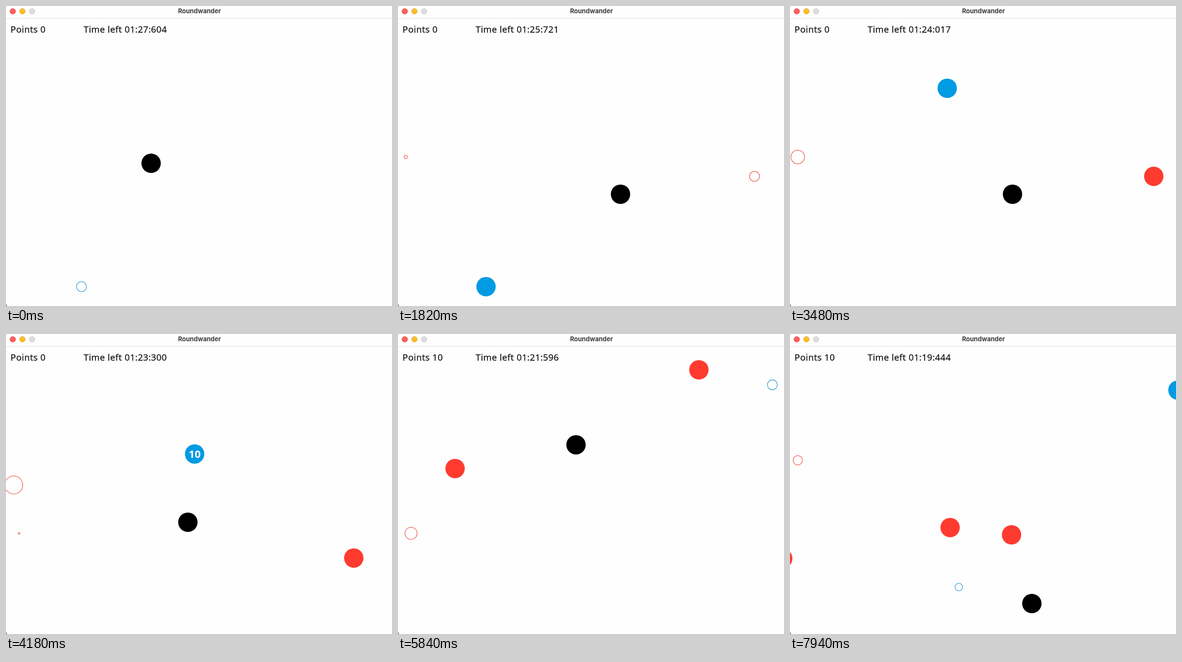
Animation of 798 by 620 pixels, one loop 8000 ms. Source, as an HTML page:

```html
<!DOCTYPE html>
<html lang="en">
<head>
<meta charset="utf-8">
<title>Roundwander</title>
<style>
  html, body { margin: 0; width: 100%; height: 100%; overflow: hidden; background: #fefefe; }
  svg { display: block; }
  .hud { font: 18.5px "Noto Sans", sans-serif; letter-spacing: .4px; fill: #161616; stroke: #161616; stroke-width: .25; }
  .title { font: 700 13px Inter, sans-serif; fill: #3c3c3c; text-anchor: middle; }
  .value { font: 700 22px "Noto Sans", sans-serif; fill: #fff; text-anchor: middle; }
</style>
</head>
<body>
<svg width="798" height="620" viewBox="0 0 798 620">
  <rect width="798" height="620" fill="#fefefe"/>
  <g id="field"></g>
  <text class="value" id="value">10</text>
  <text class="hud" id="points" x="9.3" y="55"></text>
  <text class="hud" id="clock" x="160.5" y="55"></text>
  <rect width="798" height="25" fill="#fefefe"/>
  <rect y="25" width="798" height="1" fill="#dedede"/>
  <g stroke-width=".8">
    <circle cx="14" cy="11" r="5.8" fill="#ff5f57" stroke="#e2463f"/>
    <circle cx="34" cy="11" r="5.8" fill="#febc2e" stroke="#e0a023"/>
    <circle cx="54" cy="11" r="5.8" fill="#dcdcdc" stroke="#c8c8c8"/>
  </g>
  <text class="title" x="400" y="15">Roundwander</text>
  <path d="M0 615L1.5 620H0Z" fill="#1b1b45"/>
</svg>
<script>
const LOOP = 8000, REFRESH = 87.4, TICKS_PER_REFRESH = 5.115;
const RADIUS = 20, GROWTH = .11, SPEED = 4;
const START_CLOCK = 87604, CLOCK_RATE = 1.026;
const BLUE = { fill: "#009be3", line: "#45a5d6" };
const RED = { fill: "#ff3b30", line: "#ee6055" };

// Arrow keys held by the player: first tick, number of ticks, direction.
const RIGHT = [1, 0], LEFT = [-1, 0], UP = [0, -1], DOWN = [0, 1];
const presses = [
  [15, 40, RIGHT], [61, 16, DOWN], [225, 43, LEFT], [276, 11, UP],
  [292, 20, RIGHT], [314, 117, UP], [431, 33, RIGHT]
];

// A bubble swells as a ring from tick `sprout`, turns solid at `pop`,
// then drifts: each leg is [ticks, vx, vy] in pixels per tick.
const prize = {
  color: BLUE, x: 156, y: 580, sprout: -94, pop: 81, caught: 327,
  legs: [[34, 1, 0], [45, 1, 3], [45, 2, 3], [26, 2.5, 3]]
};
const bubbles = [
  prize,
  { color: RED, x: 737, y: 352, sprout: 13, pop: 190,
    legs: [[19, 1, 0], [231, -1, 3], [Infinity, -2.7, 2]] },
  { color: RED, x: 16, y: 312, sprout: 77, pop: 279,
    legs: [[13, 0, -1], [36, 2, -1], [106, 2, 1], [Infinity, 1, 1]] },
  { color: RED, x: 27, y: 412, sprout: 229, pop: 416, legs: [[Infinity, -.86, 1.06]] },
  { color: BLUE, x: 774, y: 105, sprout: 250, pop: 437, legs: [[17, 1, 0], [Infinity, 1, 1]] },
  { color: RED, x: 16, y: 261, sprout: 377 },
  { color: BLUE, x: 349, y: 523, sprout: 394 }
];

const $ = id => document.getElementById(id);
const clamp = (v, min, max) => Math.max(min, Math.min(max, v));
const wrapY = y => ((y + 15) % 680 + 680) % 680 - 15;
const pad = (n, size) => String(n).padStart(size, "0");

function setAttributes(node, values) {
  for (const name in values) node.setAttribute(name, values[name]);
}

function newCircle() {
  return $("field").appendChild(document.createElementNS("http://www.w3.org/2000/svg", "circle"));
}

function place(node, x, y) {
  setAttributes(node, { cx: Math.round(x), cy: Math.round(wrapY(y)) });
}

function formatClock(ms) {
  return `${pad(Math.floor(ms / 60000), 2)}:${pad(Math.floor(ms / 1000) % 60, 2)}:${pad(ms % 1000, 3)}`;
}

function drawPlayer(tick) {
  let x = 300, y = 325;
  for (const [from, ticks, [dx, dy]] of presses) {
    const travelled = SPEED * clamp(tick - from, 0, ticks);
    x += dx * travelled;
    y += dy * travelled;
  }
  place(player, x, y);
}

function drawBubble({ node, color, x, y, sprout, pop = Infinity, caught = Infinity, legs = [] }, tick) {
  const solid = tick >= pop;
  let age = Math.max(0, tick - pop);
  for (const [ticks, vx, vy] of legs) {
    const spent = Math.min(age, ticks);
    x += vx * spent;
    y += vy * spent;
    age -= spent;
  }
  place(node, x, y);
  setAttributes(node, {
    r: solid ? RADIUS : clamp((tick - sprout) * GROWTH, 0, RADIUS),
    fill: solid ? color.fill : "none",
    stroke: solid ? "none" : color.line,
    "stroke-width": 1.3,
    visibility: tick > sprout && tick < caught ? "visible" : "hidden"
  });
}

// The prize shows its value once it has come to rest.
function drawValue(tick) {
  const rest = prize.legs.reduce((sum, [ticks]) => sum + ticks, prize.pop);
  setAttributes($("value"), {
    x: prize.node.getAttribute("cx"),
    y: +prize.node.getAttribute("cy") + 8,
    visibility: tick >= rest && tick < prize.caught ? "visible" : "hidden"
  });
}

for (const bubble of bubbles) bubble.node = newCircle();
const player = newCircle();
setAttributes(player, { r: RADIUS, fill: "#000" });

function draw(time) {
  const step = Math.floor((time + 17) / REFRESH);
  const tick = Math.round(step * TICKS_PER_REFRESH);
  for (const bubble of bubbles) drawBubble(bubble, tick);
  drawPlayer(tick);
  drawValue(tick);
  $("points").textContent = "Points " + (tick < prize.caught ? 0 : 10);
  $("clock").textContent = "Time left " + formatClock(Math.round(START_CLOCK - step * REFRESH * CLOCK_RATE));
}

const start = performance.now();
function animate() {
  draw((performance.now() - start) % LOOP);
  requestAnimationFrame(animate);
}
animate();
</script>
</body>
</html>
```
